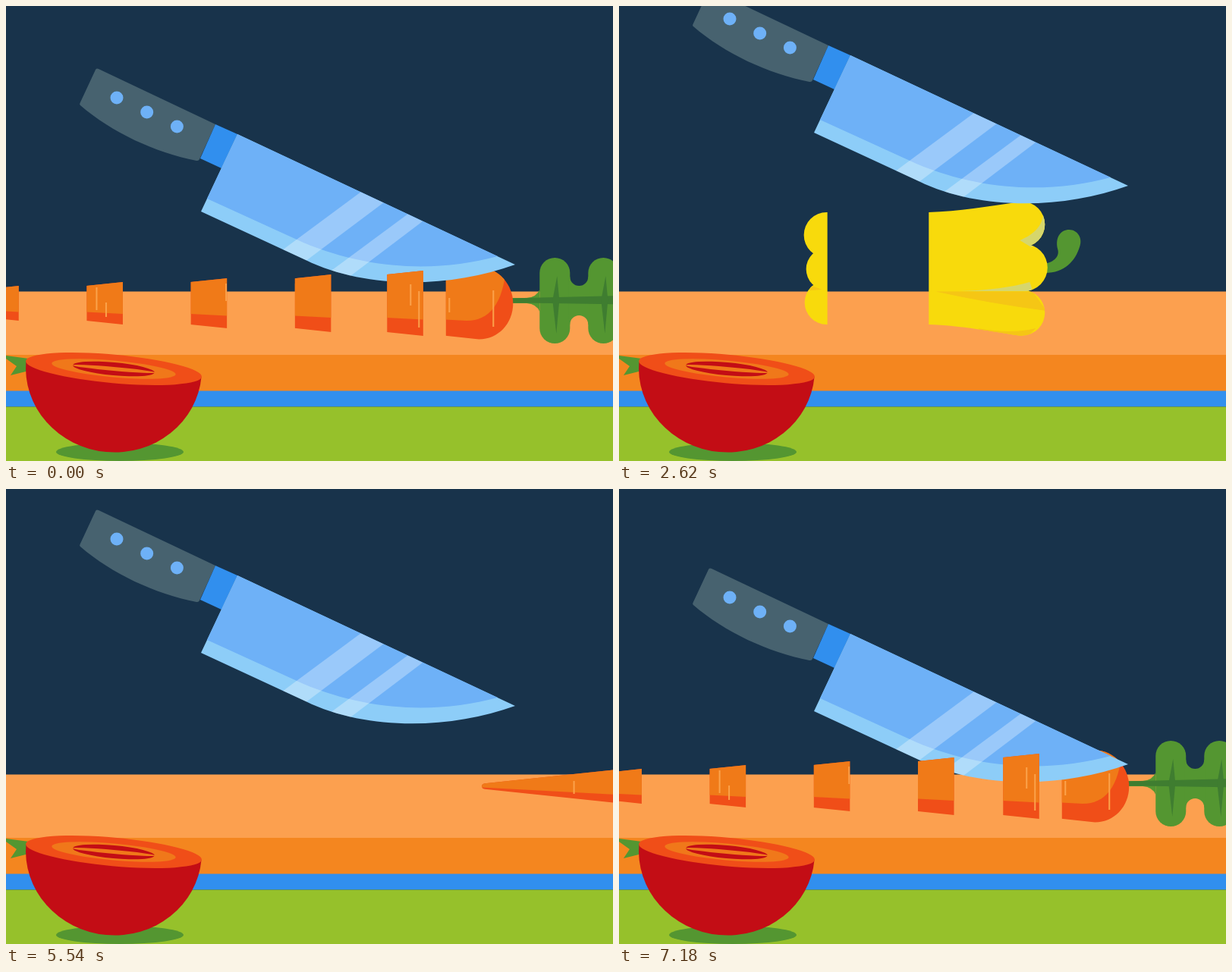
Animation, 800 px wide and 600 px high, one loop 7200 ms. Source, as an HTML page with a canvas:

```html
<!DOCTYPE html>
<html lang="en">
<head>
<meta charset="utf-8">
<title>Chopping vegetables</title>
<style>
html, body { margin: 0; width: 100%; height: 100%; overflow: hidden; background: #18334b; }
canvas { display: block; width: 800px; height: 600px; }
</style>
</head>
<body>
<canvas id="stage" width="800" height="600"></canvas>
<script>
const ctx = document.getElementById('stage').getContext('2d');
const LOOP = 7200;
const P = d => new Path2D(d);
const C = {
  night: '#18334b', board: '#fca04f', edge: '#f4861f', blue: '#318fee', lime: '#96c12b',
  green: '#549631', rib: '#3f7d30', red: '#c30d15', flesh: '#f04e18', seeds: '#f0781a',
  handle: '#47626f', steel: '#6eb1f7', shine: '#8dcdf8', carrot: '#f07a18', streak: '#fba24b',
  pepper: '#f8da0c', pepperShade: '#f5c615', pepperLight: '#d6d66c'
};

function fill(color, path) {
  ctx.fillStyle = color;
  ctx.fill(typeof path === 'string' ? P(path) : path);
}
function rect(color, x, y, w, h) {
  ctx.fillStyle = color;
  ctx.fillRect(x, y, w, h);
}
function ellipse(color, x, y, rx, ry = rx) {
  ctx.fillStyle = color;
  ctx.beginPath();
  ctx.ellipse(x, y, rx, ry, 0, 0, 7);
  ctx.fill();
}
const clamp = x => Math.min(1, Math.max(0, x));
const sine = x => (1 - Math.cos(Math.PI * clamp(x))) / 2;

// Scenery
function drawRoom() {
  rect(C.night, 0, 0, 800, 600);
  rect(C.board, 0, 376.5, 800, 84);
  rect(C.edge, 0, 460, 800, 48);
  rect(C.blue, 0, 507.5, 800, 21);
  rect(C.lime, 0, 528.5, 800, 72);
}
function drawTomato() {
  ellipse(C.green, 150, 588, 84, 12);
  fill(C.green, 'M0 461L30 465V481L6 487L14 475L0 465Z');
  ctx.save();
  ctx.translate(142, 478.5);
  ctx.rotate(0.09);
  fill(C.red, 'M-116 0A116 110 0 0 0 116 0Z');
  ellipse(C.flesh, 0, 0, 116.4, 18.8);
  ellipse(C.seeds, 0, 0, 82, 11);
  ellipse(C.red, 0, 0, 54, 8.5);
  ellipse(C.seeds, 0, 0, 55, 2.6);
  ctx.restore();
}

// Knife
const blade = P('M305 170L671 342C585 373 475 375 395 336L257 272Z');
function drawKnife(tip) {
  ctx.save();
  ctx.translate(0, tip - 342);
  fill(C.handle, 'M118 85Q119 82.500 122 84L276 157L255 203Q254 205.500 251 205C196 194 140 168 98 132Q96.500 131 97.500 129Z');
  fill(C.blue, 'M276 157L305 170L284 215L256 202Z');
  for (const i of [0, 1, 2]) ellipse(C.steel, 146 + 39.7 * i, 122 + 19 * i, 8.5);
  fill(C.shine, blade);
  fill(C.steel, 'M305 170L648 331C570 352 480 350 392 313L265 255Z');
  ctx.clip(blade);
  fill('rgba(255,255,255,.3)', 'M468 246L498 260L390 341L360 326Z');
  fill('rgba(255,255,255,.3)', 'M530 275L549 285L450 360L426 352Z');
  ctx.restore();
}
function knifeTip(t) {
  const base = 286 - 84 * (sine((t - 500) / 1000) - sine((t - 3780) / 1000));
  const pulse = (first, gap, count, time) => {
    const k = Math.min(count - 1, Math.max(0, Math.round((time - first) / gap)));
    return 86 * sine(1 - Math.abs(time - first - gap * k) / 100);
  };
  return base + pulse(2277, 400, 4, t) + pulse(5760, 200, 9, carrotTime(t));
}

// Vegetables, in their own x coordinates
const carrotBody = P('M4 388.300L421 344.500C447 344.500 466 368 466 392C466 419 446 439.500 421 439.500L4 395.700Q0 395 0 392Q0 389 4 388.300Z');
const streaks = [[121.5, 385, 402], [200.5, 371, 401], [213, 391, 410], [281.5, 366, 389],
  [361, 367, 395], [372, 376, 424], [382, 385, 404], [440, 375, 423]];

function drawLeaf() {
  const lobes = [501, 565, 629];
  ctx.fillStyle = C.green;
  for (const x of lobes) {
    ctx.beginPath();
    ctx.roundRect(x, 332, 40, 113, 20);
    ctx.fill();
  }
  for (const x of [541, 605]) {
    fill(C.green, `M${x - 2} 357H${x}A12 12 0 0 0 ${x + 24} 357H${x + 26}V420H${x + 24}A12 12 0 0 0 ${x} 420H${x - 2}Z`);
  }
  fill(C.green, 'M464 385H484Q497 384 501 374V403Q497 393 484 392H464Z');
  fill(C.rib, 'M464 385.500L480 385L645 381V394L480 391.500L464 391.500Z');
  for (const x of lobes) fill(C.rib, `M${x + 23} 356L${x + 26} 388L${x + 22} 432L${x + 17} 388Z`);
}
function drawCarrot() {
  drawLeaf();
  fill(C.flesh, carrotBody);
  ctx.clip(carrotBody);
  fill(C.carrot, 'M0 393.600L405 415C435 415 454 392 457 340H0Z');
  for (const [x, top, bottom] of streaks) rect(C.streak, x - 1, top, 2, bottom - top);
}

const pepperBody = P('M30 272C70 271 110 264 146 259L154 258V435L146 434C120 430 70 421 30 420Z');
for (const [x, y, r] of [[30, 302, 30], [31, 347, 28], [30, 391, 29], [154, 288, 30], [156.5, 345, 31], [154, 404.5, 30]]) {
  const lobe = new Path2D();
  lobe.arc(x, y, r, 0, 7);
  pepperBody.addPath(lobe);
}
function drawPepper() {
  fill(C.green, 'M182 340C194 339 204 331 201 321C197 305 205 295 216 295C227 295 234 306 230 317C224 337 209 353 182 352Z');
  fill(C.pepper, pepperBody);
  ctx.clip(pepperBody);
  fill(C.pepperLight, 'M182 273C181 290 170 301 151 309L166 318L190 300Z');
  fill(C.pepperLight, 'M70 376C110 375 140 371 164 364L168 376Z');
  fill(C.pepperShade, 'M8 368L24 374L8 375Z');
  fill(C.pepperShade, 'M40 376.500H168L186 402Q110 392 40 376.500Z');
  fill(C.pepperShade, 'M96 425Q140 433 172 425L160 437H110Z');
}

// Motion
const carrotTime = t => t < 2500 ? t + LOOP : t;
const carrot = {
  draw: drawCarrot,
  planes: Array.from({ length: 9 }, (_, k) => 45 + 47.5 * k),
  cuts: Array.from({ length: 9 }, (_, k) => 5790 + 195 * k),
  push: 350,
  feed: t => 202.5 + 0.198 * (LOOP - t) + 236 * Math.max(0, (6220 - t) / 850) ** 4
};
const pepper = {
  draw: drawPepper,
  planes: [31, 79, 126.5, 174],
  cuts: [2305, 2680, 3081, 3478],
  push: 340,
  feed: t => 307 + 439 * Math.exp((1760 - t) / 470)
};

// A slice springs loose, waits a moment, then slides away.
const slide = age => Math.max(30 * clamp(age / 20), 0.46 * (age - 15)) + 0.198 * age;

function slice(veg, x, from, to) {
  if (x + from > 800 || x + to < 0) return;
  ctx.save();
  ctx.translate(x, 0);
  ctx.beginPath();
  ctx.rect(from, 200, to - from, 300);
  ctx.clip();
  veg.draw();
  ctx.restore();
}
function drawWhole(veg, t) {
  const done = veg.cuts.filter(c => c <= t).length;
  const leave = Math.max(0, (t - veg.cuts[veg.cuts.length - 1]) / 843);
  slice(veg, veg.feed(t) - veg.push * leave ** 2, done ? veg.planes[done - 1] : -5, 700);
}
function drawSlices(veg, t) {
  veg.cuts.forEach((cut, k) => {
    if (t >= cut) slice(veg, veg.feed(cut) - slide(t - cut), k ? veg.planes[k - 1] : -5, veg.planes[k]);
  });
}

function render(t) {
  const ct = carrotTime(t);
  drawRoom();
  drawWhole(carrot, ct);
  drawWhole(pepper, t);
  drawKnife(knifeTip(t));
  drawSlices(carrot, ct);
  drawSlices(pepper, t);
  drawTomato();
}

const start = performance.now();
function tick() {
  render((performance.now() - start) % LOOP);
  requestAnimationFrame(tick);
}
tick();
</script>
</body>
</html>
```
